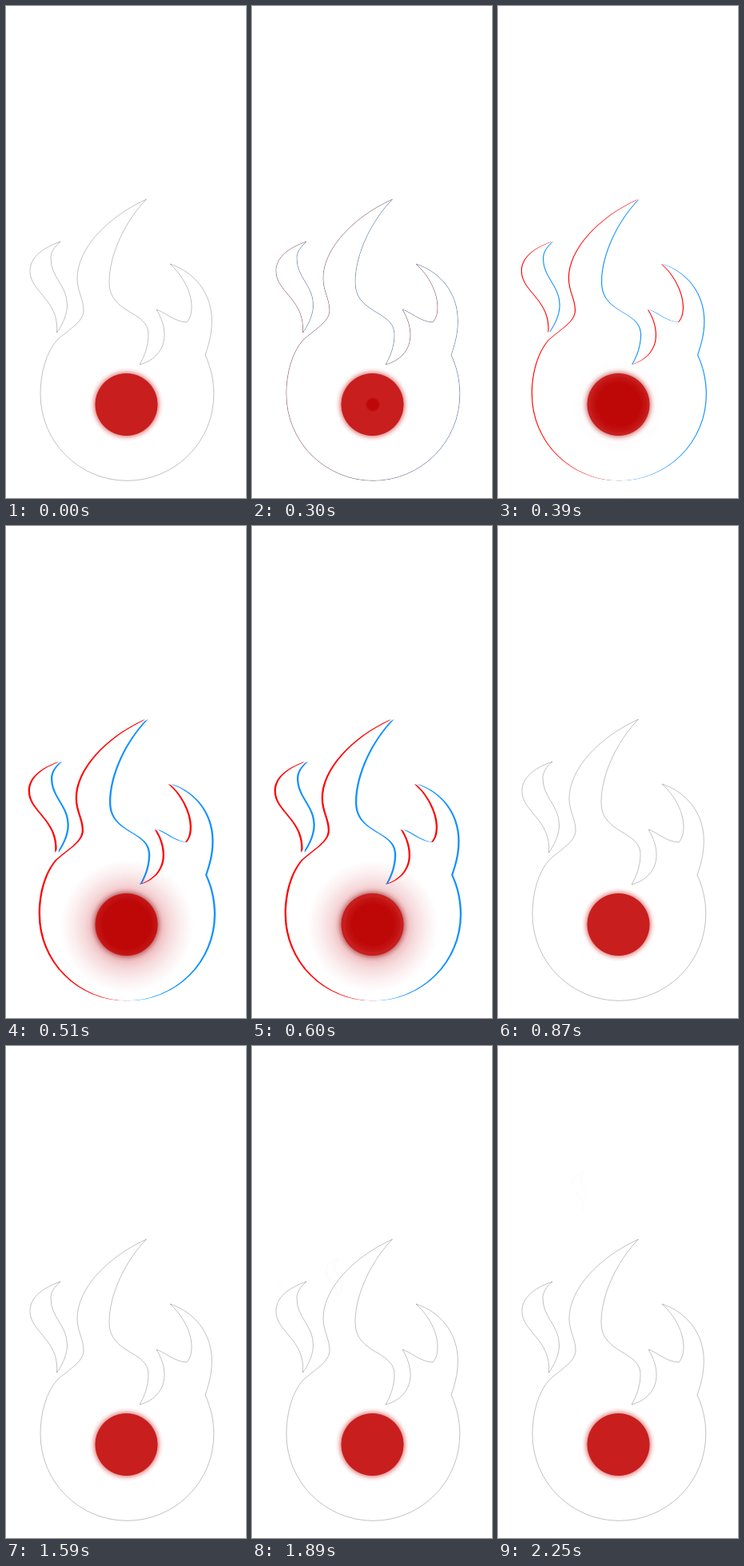
Write an HTML page with a canvas that moves like this. It is 300 px wide and 616 px high and loops after 2.31 s.

```html
<!DOCTYPE html>
<html lang="en">
<head>
<meta charset="utf-8">
<title>Flame</title>
<style>
  html, body { margin: 0; height: 100%; overflow: hidden; background: #fff; }
  canvas { display: block; width: 300px; height: 616px; }
</style>
</head>
<body>
<canvas width="300" height="616"></canvas>
<script>
const LOOP = 2310, STEP = 30;
const ctx = document.querySelector('canvas').getContext('2d');

const wisp = new Path2D(`M68 295 C45 303 30 315 30 332 C30 358 67 368 63.5 409
  C72 397 76.5 385 76.5 374 C76.5 350 56 340 56 316 C56 308 61 301 68 295 Z`);

const flame = new Path2D(`M175.5 242 C125 265 89 305 89 341 C89 357 97 367 97 381
  C97 395 80 404 64 418 C50 434 43 460 43 486 A108.4 108.4 0 0 0 259.8 486
  C259.8 469 256 452 249 437 C253 425 257.3 412 257.3 394 C257.3 360 236 333 205 323
  C222 338 232 360 232 376 C232 384 231 390 226 396 C210 395 200 384 188 380
  C194 390 198 400 198 412 C198 430 186 444 167 449 C174 437 178 424 178 411
  C178 381 129 386 129 346 C129 310 150 268 175.5 242 Z`);
flame.addPath(wisp);

const clamp = x => Math.max(0, Math.min(1, x));
const ramp = (t, a, b) => clamp((t - a) / (b - a));
const smooth = x => x * x * (3 - 2 * x);

function fillShape(dx, color) {
  ctx.save();
  ctx.translate(dx, 0);
  ctx.fillStyle = color;
  ctx.fill(flame);
  ctx.restore();
}

// Disc around the core, fading from one radius to the next
function disc(r0, r1, rgb, stops, x = 150.5, y = 499) {
  const g = ctx.createRadialGradient(x, y, r0, x, y, r1);
  stops.forEach((a, i) => g.addColorStop(i / (stops.length - 1), `rgba(${rgb},${a})`));
  ctx.fillStyle = g;
  ctx.beginPath();
  ctx.arc(x, y, r1, 0, 7);
  ctx.fill();
}

// Almost white wisps that rise and dissolve
function drawWisps(t) {
  if (t <= 1590) return;
  const p = ramp(t, 1590, 2250);
  const alpha = 0.07 * Math.sin(Math.PI * clamp(p * 0.8));
  for (const [x, y, size, rise] of [[102, 181, 0.42, 200], [37, 255, 0.2, 90]]) {
    ctx.save();
    ctx.translate(x, y + rise * (1 - p));
    ctx.scale(size, size);
    ctx.translate(-53, -352);
    ctx.lineWidth = 1.5;
    ctx.strokeStyle = `rgba(120,90,100,${alpha})`;
    ctx.stroke(wisp);
    ctx.restore();
  }
}

function draw(t) {
  ctx.fillStyle = '#fff';
  ctx.fillRect(0, 0, 300, 616);
  drawWisps(t);

  const pulse = Math.sin(Math.PI * ramp(t, 270, 840)) ** 1.5;
  if (pulse > 0.001) {
    fillShape(-2.4 * pulse, '#f00');
    fillShape(2.4 * pulse, '#1090ff');
    fillShape(0, '#fff');
  }
  ctx.lineWidth = 0.5;
  ctx.strokeStyle = `rgba(60,45,50,${0.6 * (1 - smooth(clamp(pulse * 2)))})`;
  ctx.stroke(flame);

  const halo = smooth(ramp(t, 360, 530)) * (1 - smooth(ramp(t, 540, 870)));
  if (halo > 0) {
    const a = 0.36 * halo;
    disc(38, 48 + 36 * Math.sqrt(halo), '200,30,40', [a, a * 0.5, a * 0.2, 0], 151, 501);
  }
  disc(37, 46.5, `${200 - 60 * pulse},20,20`, [0.7, 0.32, 0.09, 0]);
  disc(38.5, 39.5, '200,30,30', [1, 0]);

  const dark = 40 * ramp(t, 270, 405) * (1 - ramp(t, 570, 790));
  if (dark > 1) disc(dark * 0.75, Math.min(dark, 39), '190,8,8', [1, 0.3], 151);
}

const start = performance.now();
function tick(now) {
  const t = Math.max(0, now - start) % LOOP;
  draw(Math.floor(t / STEP) * STEP);
  requestAnimationFrame(tick);
}
draw(0);
requestAnimationFrame(tick);
</script>
</body>
</html>
```
